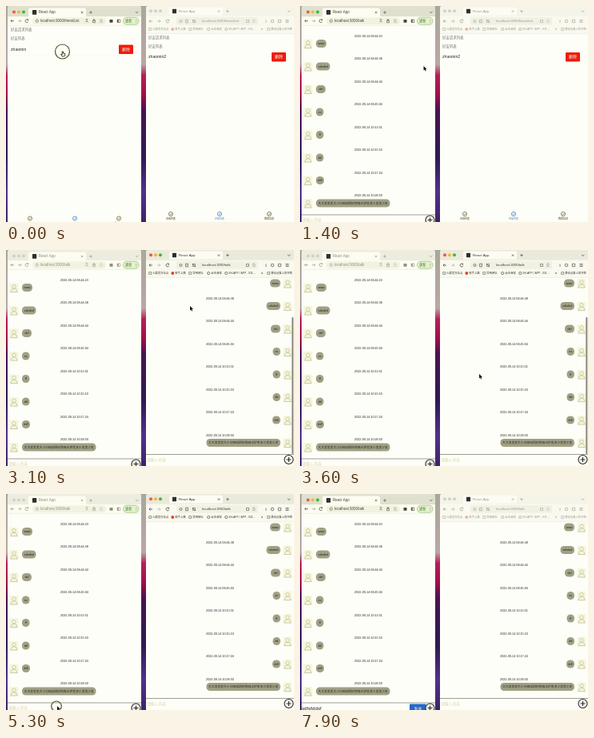
An HTML page with a canvas for the animation above (8 s loop, 360x270 px).

```html
<!DOCTYPE html>
<html lang="zh">
<head>
<meta charset="utf-8">
<title>Chat</title>
<style>
html, body { margin: 0; width: 100%; height: 100%; overflow: hidden; background: #fefef9; }
canvas { display: block; width: 360px; height: 270px; }
</style>
</head>
<body>
<canvas id="stage"></canvas>
<script>
const W = 360, H = 270, LOOP = 8000, STEP = 100;
const FONT = '"Liberation Sans", "Noto Sans CJK SC", "Noto Sans CJK", sans-serif';
const PAPER = '#fefef9', INK = '#25251f', OLIVE = '#5c5c28', BLUE = '#2f78c8';

const canvas = document.getElementById('stage');
const scale = window.devicePixelRatio || 1;
canvas.width = W * scale;
canvas.height = H * scale;
const c = canvas.getContext('2d');

// Drawing helpers
function rect(x, y, w, h, fill, r = 0) {
  c.fillStyle = fill;
  c.beginPath();
  c.roundRect(x, y, w, h, r);
  c.fill();
}

function text(str, x, y, size, color = INK, align = 'left', weight = 400) {
  c.font = `${weight} ${size}px ${FONT}`;
  c.textAlign = align;
  c.textBaseline = 'middle';
  c.fillStyle = color;
  c.fillText(str, x, y);
}

function dot(x, y, r, fill) {
  c.fillStyle = fill;
  c.beginPath();
  c.arc(x, y, r, 0, 7);
  c.fill();
}

function ring(x, y, r, color, width = 0.7) {
  c.strokeStyle = color;
  c.lineWidth = width;
  c.beginPath();
  c.arc(x, y, r, 0, 7);
  c.stroke();
}

function line(points, color, width = 0.7) {
  c.strokeStyle = color;
  c.lineWidth = width;
  c.beginPath();
  points.forEach(([x, y], i) => i ? c.lineTo(x, y) : c.moveTo(x, y));
  c.stroke();
}

function box(x, y, w, h, color, width = 0.6) {
  c.strokeStyle = color;
  c.lineWidth = width;
  c.strokeRect(x - w / 2, y - h / 2, w, h);
}

function arrow(x, y, dir, color) {
  line([[x - 2, y], [x + 2, y]], color);
  line([[x + dir * 0.4, y - 1.7], [x + dir * 2, y], [x + dir * 0.4, y + 1.7]], color);
}

function reload(x, y, color) {
  c.strokeStyle = color;
  c.lineWidth = 0.7;
  c.beginPath();
  c.arc(x, y, 1.9, 0.3, 5.4);
  c.stroke();
  rect(x + 0.8, y - 2.1, 1.3, 1.3, color);
}

function cross(x, y, r, color, width = 0.6) {
  line([[x - r, y - r], [x + r, y + r]], color, width);
  line([[x - r, y + r], [x + r, y - r]], color, width);
}

function plus(x, y, r, color, width = 0.6) {
  line([[x - r, y], [x + r, y]], color, width);
  line([[x, y - r], [x, y + r]], color, width);
}

function lights(x, y, active) {
  const colors = active ? ['#f0574e', '#f2b92e', '#42b83e'] : Array(3).fill('#d2d2c4');
  colors.forEach((color, i) => dot(x + i * 6, y, 2, color));
}

// Page parts
function wallpaper() {
  const g = c.createLinearGradient(0, 0, 0, H);
  [[0, '#aaa69c'], [0.27, '#b8a8a2'], [0.32, '#b52058'], [0.41, '#a01048'],
   [0.48, '#4a1450'], [0.7, '#2c1c52'], [0.86, '#51328a'], [1, '#3c2468']]
    .forEach(([at, color]) => g.addColorStop(at, color));
  c.fillStyle = g;
  c.fillRect(0, 0, W, H);
}

function navIcon(x, y, label, active) {
  const color = active ? BLUE : OLIVE;
  ring(x, y, 2.6, color);
  line([[x - 1.3, y], [x - 0.2, y + 1.1], [x + 1.7, y - 1.2]], color);
  text(label, x, y + 6.3, 3, active ? BLUE : INK, 'center');
}

function friendPage(x, y, name, button, navY, navXs) {
  text('好友请求列表', x, y, 4.4, '#77776a');
  text('好友列表', x, y + 11.3, 4.4, '#77776a');
  text(name, x, y + 24.5, 5.1, INK);
  rect(button, y + 18.7, 18, 11.5, '#ee1c0c', 1);
  text('删除', button + 9, y + 24.5, 4.9, '#fff', 'center');
  line([[x - 3, y + 32], [button + 18, y + 32]], '#f6f6e8', 0.5);
  ['对话列表', '好友列表', '我的信息'].forEach((label, i) => navIcon(navXs[i], navY, label, i === 1));
}

function avatar(x, y) {
  rect(x - 5.5, y - 6, 11, 12, '#f6f6da', 1);
  ring(x, y - 1.8, 2.3, '#b4b496', 0.6);
  c.beginPath();
  c.arc(x, y + 4.8, 4, Math.PI, 0);
  c.stroke();
  line([[x - 4.5, y + 5], [x + 4.5, y + 5]], '#b4b496', 0.6);
}

const messages = [
  ['08:44:23', 'www', 13], ['08:44:38', 'sdsdsd', 17.5], ['08:44:44', 'dsf', 12],
  ['08:45:04', 'ss', 9.5], ['10:13:51', 'ff', 9.5], ['10:15:10', 'dd', 9.5],
  ['10:17:24', 'ddf', 10], ['10:28:50', '大大发发发大小分网站回好防吸尘护发多少发发少发', 92.5]
];

function chat(left, right, firstY, mine) {
  const faceX = mine ? right - 8 : left + 8;
  avatar(faceX, firstY - 28.5);
  messages.forEach(([time, body, w], i) => {
    const y = firstY + i * 28.5;
    const x = mine ? right - 17 - w : left + 18;
    text('2022-09-14 ' + time, (left + right) / 2, y - 9.5, 3.75, INK, 'center');
    avatar(faceX, y + 0.5);
    rect(x, y - 5, w, 10, '#a0a084', 4.6);
    text(body, x + w / 2, y, 3.8, INK, 'center');
  });
}

function inputBar(left, right, y, value, sending, caret) {
  rect(left, y - 7, right - left, H - y + 7, PAPER);
  line([[left, y - 6.5], [right, y - 6.5]], '#77776c', 0.7);
  if (value) text(value, left, y + 1, 6.2, INK);
  else text('请输入内容', left + 1, y + 0.5, 4.8, '#d9d69e');
  if (caret) {
    const x = left + 0.7 + (value ? c.measureText(value).width : 0);
    line([[x, y - 2.5], [x, y + 4]], INK, 0.5);
  }
  if (sending) {
    rect(right - 32, y - 5, 20.5, 12, '#2667c6', 0.6);
    text('发送', right - 21.7, y + 0.7, 4.8, '#fff', 'center');
  }
  const px = right - 6.5;
  dot(px, y, 5.7, PAPER);
  ring(px, y, 5.5, INK, 1.1);
  plus(px, y, 3, INK, 1.1);
}

// Browser windows
function windowClip(x, w, draw) {
  c.save();
  c.beginPath();
  c.roundRect(x, 0, w, H + 10, 3);
  c.clip();
  rect(x, 0, w, H, PAPER);
  draw();
  c.restore();
}

function leftChrome(path, active) {
  const ink = active ? '#45453c' : '#8f8f80';
  rect(2, 0, 167, 13.5, active ? '#dfe0cd' : '#ececdf');
  lights(10, 7.5, active);
  rect(28, 2.5, 72, 12, '#fcfcf0', 2.5);
  rect(33, 5, 5.2, 5.8, '#2d302f', 0.5);
  text('React App', 40.8, 8, 4.5, ink);
  cross(95, 8, 1.2, ink);
  plus(106, 8, 1.8, ink);
  line([[162, 7], [163.7, 8.7], [165.4, 7]], ink);

  rect(2, 13.2, 167, 11.3, '#fcfcf0');
  arrow(8, 18.7, -1, ink);
  arrow(17, 18.7, 1, '#a3a394');
  reload(26, 18.7, ink);
  rect(33, 14.4, 92, 8.7, '#f1f2df', 4);
  ring(38.8, 18.7, 1.6, ink, 0.6);
  text('localhost:3000/' + path, 43, 18.8, 4.5, ink);
  text('文', 101, 18.7, 4, ink, 'center');
  box(110, 19.2, 2.8, 3, ink);
  line([[110, 19], [110, 15.8]], ink, 0.6);
  text('☆', 119, 18.5, 5, ink, 'center');
  rect(129.5, 17, 4, 3.8, ink, 0.5);
  box(141, 18.8, 3.6, 3.6, ink);
  rect(139.2, 17, 1.5, 3.6, ink);
  rect(146.5, 14.2, 19.5, 9, '#e6f1cd', 4.4);
  c.strokeStyle = '#70a44c';
  c.lineWidth = 0.5;
  c.stroke();
  text('更新', 149, 18.8, 4.3, '#3b7d35');
  [-1.5, 0, 1.5].forEach(d => dot(162.8, 18.7 + d, 0.45, '#3b7d35'));
  line([[2, 24.4], [169, 24.4]], '#e4e4d2', 0.5);
}

function rightChrome(path, active) {
  const ink = active ? '#37372f' : '#99998a';
  rect(175, 0, 185, 13.2, active ? '#e9e9dc' : '#f4f4e9');
  lights(181, 6.3, active);
  rect(204, 1.5, 67, 10.3, '#fcfcf3', 1.5);
  rect(208, 3.8, 5, 5.5, '#2d302f', 0.5);
  text('React App', 216, 6.7, 4.4, ink);
  cross(266, 6.6, 1.2, ink);
  plus(277, 6.6, 1.7, ink);
  line([[352, 5.8], [353.7, 7.4], [355.4, 5.8]], ink);

  rect(175, 12.8, 185, 21.7, '#f9f9ef');
  arrow(181, 19, -1, ink);
  arrow(191, 19, 1, '#b1b1a2');
  reload(202, 19, ink);
  rect(213, 14.3, 102, 9.2, '#f0f0e3', 1.3);
  ring(218.5, 19, 1.5, ink, 0.6);
  box(226, 19, 2.8, 3.5, ink);
  line([[233, 17], [237, 21]], ink, 0.6);
  box(235, 19, 3, 3, ink, 0.5);
  text('localhost:3000/' + path, 245, 19.1, 4.3, ink);
  box(302, 19, 3, 3, ink, 0.5);
  text('☆', 310, 18.8, 4.8, ink, 'center');
  line([[325, 17.5], [325, 21]], ink, 0.6);
  ring(333, 19, 1.8, ink, 0.6);
  box(342, 19, 3.4, 3.4, ink, 0.6);
  [-1.5, 0, 1.5].forEach(d => line([[349.5, 19 + d], [353.5, 19 + d]], ink, 0.6));

  const marks = [[179, '火狐官方站点'], [207, '新手上路'], [229, '常用网址'],
    [252, '云禾商城'], [274, 'SH-APP / APP - 031…'], [327, '移动设备上的书签']];
  marks.forEach(([x, label], i) => {
    if (i === 1) dot(x + 1.3, 29, 1.9, active ? '#d94428' : '#e2b7a0');
    else if (i === 3 || i === 4) ring(x + 1.2, 29, 1.6, ink, 0.6);
    else box(x + 1.2, 29, 3, 2.8, ink, 0.5);
    text(label, x + 4.2, 29.1, 3.35, ink);
  });
  text('»', 320, 28.8, 4.5, ink, 'center');
  line([[175, 34.4], [360, 34.4]], '#e7e7d8', 0.5);
}

function leftWindow(t, active) {
  windowClip(2, 167, () => {
    const talking = t >= 200;
    if (talking) {
      chat(2, 169, 47, false);
      inputBar(2, 169, 267.5, typed(t), t >= 6500, t >= 5900 && t % 1000 < 500);
      if (t < 1400) rect(166, 64, 2, 196, '#99998c', 1);
    } else {
      friendPage(6, 29.7, 'zhaomin', 141, 265.5, [30, 86, 141]);
    }
    leftChrome(talking ? 'talk' : 'friendList', active);
  });
}

function rightWindow(t, active) {
  windowClip(175, 190, () => {
    const talking = t >= 3000;
    if (talking) {
      chat(175, 360, 41.5, true);
      inputBar(175, 360, 262, '', false, false);
      if (t < 4300) rect(357.3, 84, 2, 171, '#88887c', 1);
    } else {
      friendPage(178, 39.3, 'zhaomin2', 332, 260, [206, 267, 329]);
    }
    rightChrome(talking ? 'talk' : 'friendList', active);
  });
}

// Motion
function typed(t) {
  if (t < 6500) return '';
  const n = t < 7400 ? 1 + Math.floor((t - 6500) / 150) : 5 + Math.floor((t - 7400) / 100);
  return 'sdfsfddsf'.slice(0, t < 7400 ? Math.min(n, 4) : n);
}

const path = [
  [0, 71, 58], [1000, 71, 58], [1800, 238, 92], [2200, 230, 70], [3100, 230, 70],
  [3600, 224, 155], [3800, 224, 155], [4800, 64, 265], [LOOP, 64, 265]
];

function pointerAt(t) {
  const i = path.findIndex(p => p[0] > t);
  const [t0, x0, y0] = path[i - 1], [t1, x1, y1] = path[i];
  const k = (t - t0) / (t1 - t0), e = k * k * (3 - 2 * k);
  return [x0 + (x1 - x0) * e, y0 + (y1 - y0) * e];
}

function outline(points, x, y) {
  c.beginPath();
  points.forEach(([dx, dy]) => c.lineTo(x + dx, y + dy));
  c.closePath();
  c.lineJoin = 'round';
  c.lineWidth = 0.9;
}

function pointer(x, y, hand) {
  if (hand) {
    outline([[-0.8, -1], [0.4, -1], [0.5, 1], [2.8, 1.5], [2.7, 4], [1.8, 5], [-0.8, 5], [-2.4, 2.5], [-0.7, 2.6]], x, y);
    c.fillStyle = '#fff';
    c.strokeStyle = INK;
    c.fill();
    c.stroke();
    return;
  }
  outline([[0, 0], [0, 5.6], [1.3, 4.5], [2.2, 6.4], [3.2, 6], [2.3, 4.1], [4, 4]], x, y);
  c.strokeStyle = '#fff';
  c.stroke();
  c.fillStyle = '#111';
  c.fill();
}

// start, end, x, y, radius
const clicks = [
  [0, 200, 70.5, 57, 9], [1900, 2100, 236, 84, 7], [2800, 3000, 230, 71, 9],
  [5300, 5500, 63, 265.3, 6.3], [5900, 6300, 63, 265.3, 6.3]
];

function draw(t) {
  const rightActive = t >= 1900 && t < 5400;
  c.setTransform(scale, 0, 0, scale, 0, 0);
  wallpaper();
  leftWindow(t, !rightActive);
  rightWindow(t, rightActive);
  clicks.forEach(([from, to, x, y, r]) => {
    if (t >= from && t < to) ring(x, y, r, '#55551f', 1.2);
  });
  if (t < 6500) {
    const [x, y] = pointerAt(t);
    pointer(x, y, t < 200 || (t >= 2200 && t < 3000));
  }
}

function tick(now) {
  draw(Math.floor((now % LOOP) / STEP) * STEP);
  requestAnimationFrame(tick);
}
draw(0);
requestAnimationFrame(tick);
</script>
</body>
</html>
```
